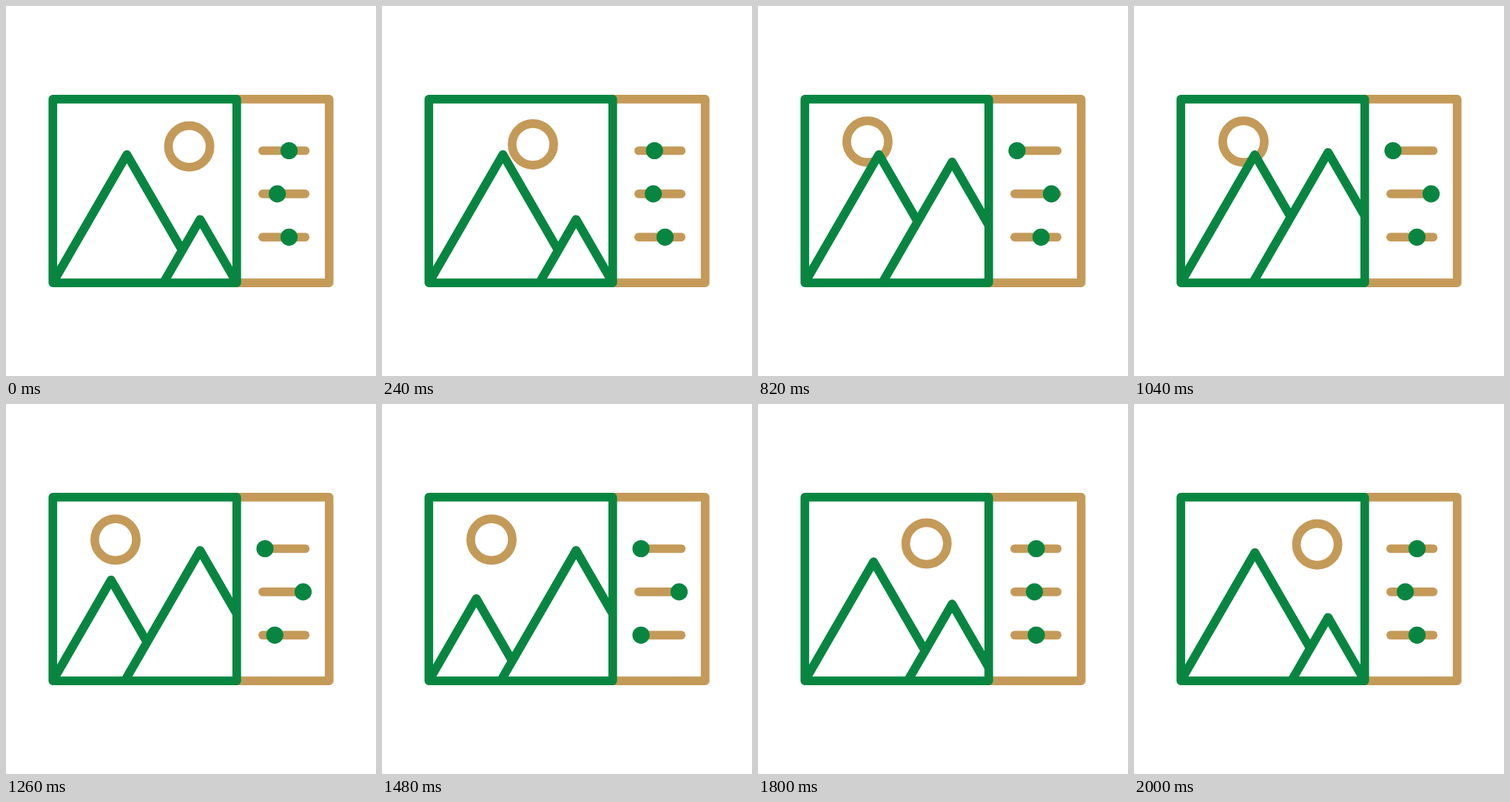
An HTML page with a canvas for the animation above (2.02 s loop, 500 by 500 pixels).

```html
<!DOCTYPE html>
<html lang="en">
<head>
<meta charset="utf-8">
<title>Image settings</title>
<style>
  html, body { margin: 0; width: 100%; height: 100%; overflow: hidden; background: #fff; }
  canvas { display: block; width: 500px; height: 500px; }
</style>
</head>
<body>
<canvas id="stage" width="500" height="500"></canvas>
<script>
const ctx = document.getElementById('stage').getContext('2d');
const GREEN = '#088641', TAN = '#c49a59';
const LOOP = 2020, STEP = 20, PHASE = 500, LEAD = 2.2;
const LEFT = 63.3, RIGHT = 311.8, TOP = 125.8, BASE = 374.2, EDGE = 436.7;
const SLOPE = Math.sqrt(3);

const mix = (a, b, k) => a + (b - a) * k;

// Cubic bezier (.75, 0, .25, 1), solved by bisection
function ease(x) {
  if (x <= 0) return 0;
  if (x >= 1) return 1;
  let lo = 0, hi = 1;
  for (let i = 0; i < 30; i++) {
    const s = (lo + hi) / 2, r = 1 - s;
    if (2.25 * s * r * r + 0.75 * s * s * r + s * s * s < x) lo = s;
    else hi = s;
  }
  return lo * lo * (3 - 2 * lo);
}

function line(points, color) {
  ctx.beginPath();
  points.forEach(([x, y]) => ctx.lineTo(x, y));
  ctx.strokeStyle = color;
  ctx.stroke();
}

function mountain(x, y) {
  const half = (BASE - y) / SLOPE;
  const points = [[x - half, BASE], [x, y], [x + half, BASE]];
  line(points, GREEN);
  ctx.fillStyle = '#fff';
  ctx.fill();
  line(points, GREEN);
}

function sun(x, y) {
  ctx.beginPath();
  ctx.arc(x, y, 28.1, 0, Math.PI * 2);
  ctx.strokeStyle = TAN;
  ctx.stroke();
}

function slider(y, x) {
  line([[346.9, y], [404.3, y]], TAN);
  ctx.beginPath();
  ctx.arc(x, y, 11.6, 0, Math.PI * 2);
  ctx.fillStyle = GREEN;
  ctx.fill();
}

function draw(ms) {
  const t = Math.floor((ms % LOOP) / STEP) * STEP + LEAD;
  const phase = n => ease((t - n * PHASE) / PHASE);
  const back = phase(3);
  const [a, b, c] = [0, 1, 2].map(n => phase(n) * (1 - back));

  ctx.fillStyle = '#fff';
  ctx.fillRect(0, 0, 500, 500);
  ctx.lineWidth = 11.7;
  ctx.lineCap = ctx.lineJoin = 'round';

  line([[RIGHT, TOP], [EDGE, TOP], [EDGE, BASE], [RIGHT, BASE]], TAN);

  ctx.save();
  ctx.beginPath();
  ctx.rect(LEFT, TOP, RIGHT - LEFT, BASE - TOP);
  ctx.clip();
  sun(mix(247.6, 148, a), mix(189.8, 183.3, a));
  const peak = mix(200.9, 263.2, c);
  mountain(LEFT + (BASE - peak) / SLOPE, peak);
  mountain(262.3, mix(288.5, 198, b));
  ctx.restore();

  ctx.strokeStyle = GREEN;
  ctx.strokeRect(LEFT, TOP, RIGHT - LEFT, BASE - TOP);

  slider(195.5, mix(382.5, 350, a));
  slider(253.9, mix(366.6, 401.5, b));
  slider(312.3, mix(382.5, 350, c));
}

const start = performance.now();
function tick() {
  draw(performance.now() - start);
  requestAnimationFrame(tick);
}
tick();
</script>
</body>
</html>
```
